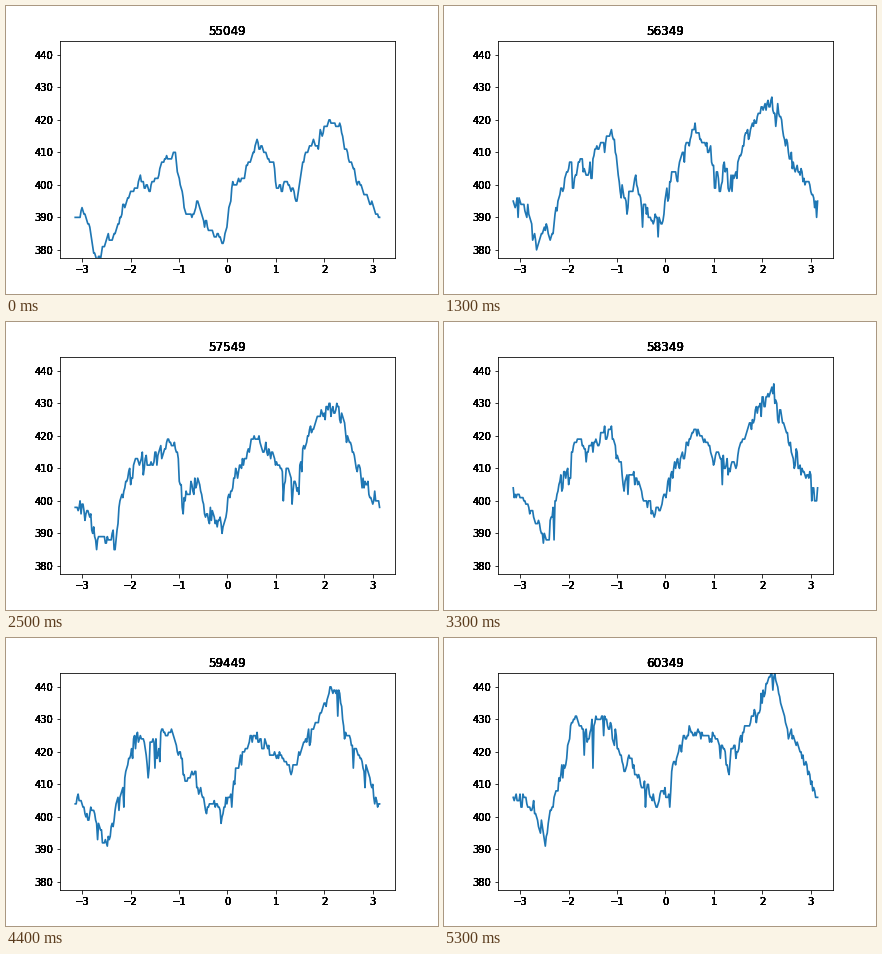
A matplotlib script that plays this animation: 432 px wide and 288 px high, repeating every 5400 ms.

```python
import numpy as np
import matplotlib.pyplot as plt
from matplotlib.animation import FuncAnimation

FRAMES, STEP_MS = 54, 100
FIRST_COUNT, COUNT_STEP = 55049, 100
SITES = 314
PRINTS = 8

plt.rcParams.update({"font.family": "DejaVu Sans", "font.size": 10})

rng = np.random.default_rng(7)
x = np.linspace(-np.pi, np.pi, SITES)

# Turning points of the surface at both ends of the run
start_points = [
    (-3.14, 390), (-2.99, 392), (-2.84, 387), (-2.68, 377), (-2.48, 385),
    (-2.4, 382.5), (-2.09, 394.5), (-1.77, 402.5), (-1.62, 398),
    (-1.35, 406), (-1.11, 411), (-.87, 392), (-.73, 390), (-.62, 397),
    (-.48, 388), (-.08, 382.5), (.12, 401), (.3, 402), (.62, 413),
    (.95, 405), (1.03, 399), (1.25, 402), (1.43, 396), (1.62, 410.5),
    (2.13, 419.5), (2.3, 418), (2.7, 400), (3.14, 390)]
end_points = [
    (-3.14, 408), (-2.69, 403), (-2.48, 392), (-2.24, 410), (-1.88, 429.5),
    (-1.65, 426), (-1.5, 429), (-1.15, 428), (-.85, 416.5), (-.7, 418),
    (-.5, 410), (-.17, 404.5), (.12, 413), (.47, 426.5), (1.1, 423),
    (1.3, 416), (1.55, 423), (2.09, 441.5), (2.24, 444), (2.5, 428),
    (2.9, 417), (3.14, 408)]


def roughness():
    return np.convolve(rng.normal(0, 1.6, SITES), [.25, .5, .25], "same")


def grow():
    """Random clumps of sites jump up to the rising trend; the rest wait."""
    start, end = (np.interp(x, *zip(*p)) for p in (start_points, end_points))
    surface = start + roughness()
    rows = []
    for i in range(FRAMES):
        trend = start + (end - start) * i / (FRAMES - 1)
        clumps = np.convolve(rng.normal(size=SITES), np.ones(5), "same") > 2
        target = trend + 0.9 + roughness()
        if i:
            surface = np.where(clumps, np.maximum(surface, target), surface)
        surface[-1] = surface[0]
        rows.append(np.round(surface))
    return rows


def heavy_text(text, xy, coords, offset, **style):
    """Overprint a label so its edges come out dark."""
    return [ax.annotate(text, xy, xycoords=coords, xytext=offset,
                        textcoords="offset points", annotation_clip=False,
                        **style)
            for _ in range(PRINTS)]


heights = grow()
fig, ax = plt.subplots(figsize=(6, 4), dpi=72)
fig.subplots_adjust(left=.125, right=.9, bottom=.125, top=.88)
ax.set_xlim(-1.1 * np.pi, 1.1 * np.pi)
ax.set_ylim(377.5, 444.4)
ax.set_xticks(range(-3, 4))
ax.set_yticks(range(380, 441, 10))
ax.tick_params(labelbottom=False, labelleft=False)

for v in range(-3, 4):
    heavy_text(str(v).replace("-", "\u2212"), (v, 0), ax.get_xaxis_transform(),
               (0, -7), ha="center", va="top")
for v in range(380, 441, 10):
    heavy_text(str(v), (0, v), ax.get_yaxis_transform(),
               (-7, 0), ha="right", va="center_baseline")
titles = heavy_text("", (.5, 1), "axes fraction", (0, 6),
                    ha="center", va="baseline", fontsize=12)
line, = ax.plot(x, heights[0], color="#1f77b4", lw=1.7)


def update(i):
    line.set_ydata(heights[i])
    for title in titles:
        title.set_text(str(FIRST_COUNT + COUNT_STEP * i))
    return [line, *titles]


anim = FuncAnimation(fig, update, frames=FRAMES, interval=STEP_MS,
                     repeat=True, repeat_delay=0)
plt.show()
```
